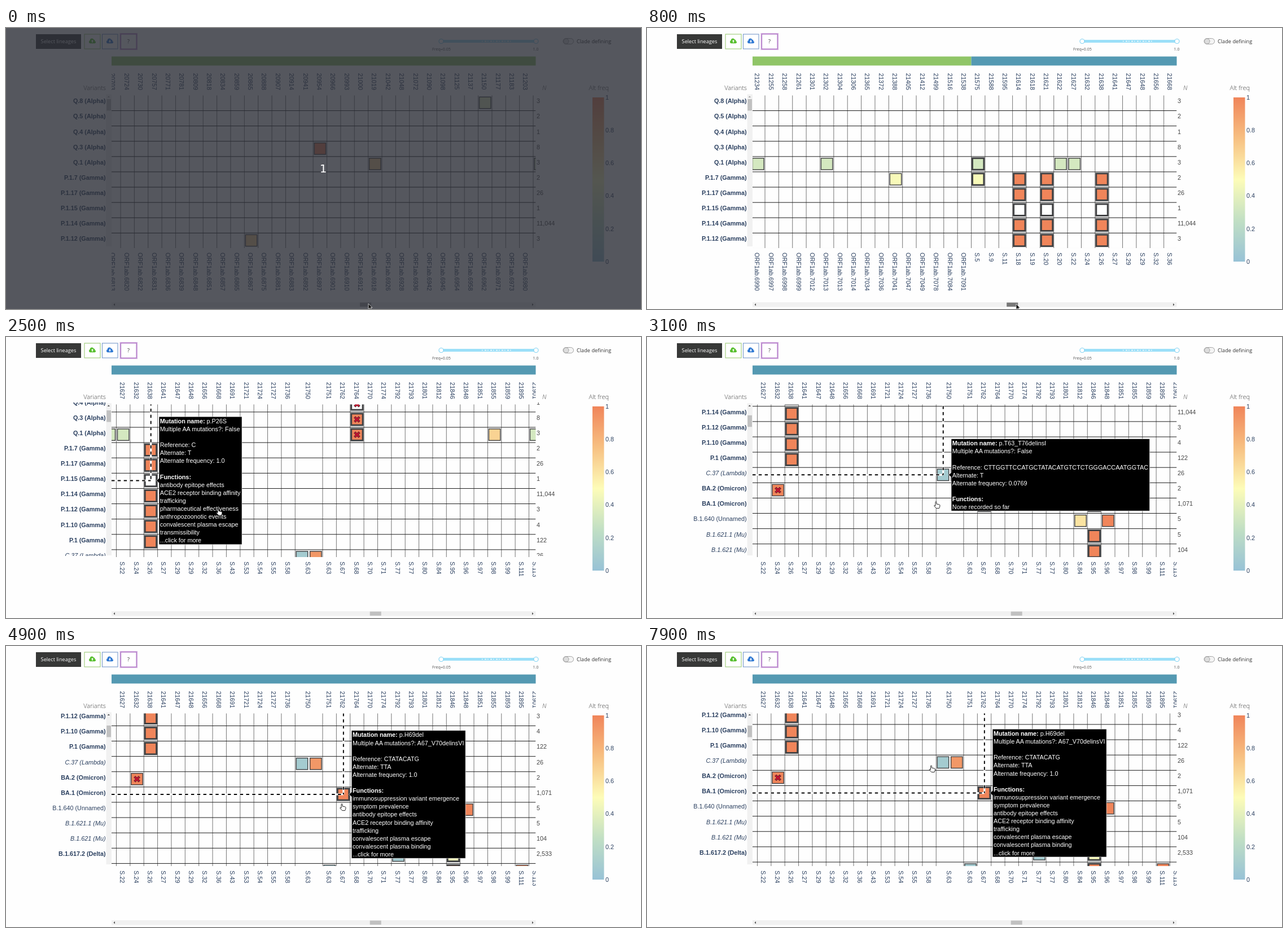
Write an HTML page that moves like this. It is 1125x498 px and loops after 8000 ms.

```html
<!DOCTYPE html>
<html lang="en">
<head>
<meta charset="utf-8">
<title>Mutation heatmap</title>
<style>
  html, body { margin: 0; width: 100%; height: 100%; overflow: hidden; background: #fefefe; }
  svg { display: block; width: 1125px; height: 498px; }
  text { font: 10.8px "Liberation Sans", Arial, sans-serif; fill: #2a3f5f; white-space: pre; }
  .ui { font: 9.2px "Open Sans", sans-serif; fill: #333; }
  .small { font-size: 7.1px; fill: #555; }
  .title { font: 300 11px "Open Sans", sans-serif; fill: #444; }
  .b { font-weight: bold; }
  .i { font-style: italic; }
  .n { fill: #444; }
  .end { text-anchor: end; }
  .mid { text-anchor: middle; }
  .tip text { fill: #fff; }
  .count { font: 20px "DejaVu Sans", sans-serif; fill: #fff; }
</style>
</head>
<body>
<svg viewBox="0 0 1125 498">
  <defs>
    <clipPath id="strip"><rect x="187" y="40" width="751.5" height="440"/></clipPath>
    <clipPath id="plot"><rect x="187" y="119.5" width="751.5" height="270.5"/></clipPath>
    <clipPath id="names"><rect y="116" width="1125" height="272"/></clipPath>
    <linearGradient id="scale" x1="0" y1="1" x2="0" y2="0"></linearGradient>
    <path id="cloud" d="M-3.7 4.3a2.7 2.7 0 0 1-.6-5.2A3.5 3.5 0 0 1 2.4-2.4 2.4 2.4 0 0 1 4.6.2 2.1 2.1 0 0 1 3.8 4.3z"/>
    <path id="arrow" d="M0-2l2.2 2.3H.8V2.8H-.8V.3H-2.2z" fill="#fff"/>
  </defs>
  <rect width="1125" height="498" fill="#fefefe"/>

  <rect x="53" y="11" width="80" height="26" fill="#373837"/>
  <text class="ui mid" x="93" y="27" style="fill:#fff">Select lineages</text>
  <g fill="#fff">
    <rect x="139" y="11" width="28" height="26" stroke="#92c66b"/>
    <rect x="170.5" y="11" width="27.5" height="26" stroke="#6c90c6"/>
    <rect x="203" y="10.5" width="28.5" height="27" stroke="#d3addf" stroke-width="3"/>
    <rect x="203.5" y="11" width="27.5" height="26" stroke="#a366bd"/>
  </g>
  <g transform="translate(153 23)"><use href="#cloud" fill="#57bf2e"/><use href="#arrow"/></g>
  <g transform="translate(184 23)"><use href="#cloud" fill="#3079d3"/><use href="#arrow" transform="translate(0 1) scale(1 -1)"/></g>
  <text class="ui mid" x="217" y="27">?</text>

  <rect x="771" y="21" width="168" height="5" rx="2" fill="#9bdff8"/>
  <path d="M843 23.5h53" stroke="#fff" stroke-width="1.5" stroke-dasharray="1.5 3.5 3 2"/>
  <g fill="#fff" stroke="#86d4f3" stroke-width="1.2"><circle cx="771" cy="23.5" r="4"/><circle cx="939" cy="23.5" r="4"/></g>
  <text class="ui small mid" x="771.5" y="39.5">Freq=0.05</text>
  <text class="ui small mid" x="938.5" y="39.5">1.0</text>
  <g stroke="#999" stroke-width=".9">
    <rect x="987" y="18.5" width="18.5" height="10" rx="5" fill="#f4f4f4"/>
    <circle cx="992.3" cy="23.5" r="4.7" fill="#ddd"/>
  </g>
  <text class="ui" x="1011" y="27">Clade defining</text>

  <text class="title end" x="177" y="110">Variants</text>
  <text class="title i" x="950" y="110">N</text>
  <text class="title" x="1032.5" y="110">Alt freq</text>
  <rect x="1039" y="123" width="20.5" height="291" fill="url(#scale)"/>
  <g id="ticks"></g>

  <g clip-path="url(#strip)"><g id="heads"></g></g>
  <g clip-path="url(#names)"><g id="labels"></g></g>
  <g clip-path="url(#plot)">
    <g id="cols"></g>
    <g id="rows"></g>
    <g id="cells"></g>
    <g id="tips"></g>
  </g>

  <rect x="177.5" y="117.5" width="9.5" height="269.5" fill="#f1f1f1"/>
  <path id="up" d="M179.6 123h4.4l-2.2-2.5z"/>
  <rect id="vthumb" x="178.2" y="126" width="7.8" height="20.5" fill="#c1c1c1"/>
  <rect x="187" y="486" width="751.5" height="8.5" fill="#f1f1f1"/>
  <path d="M193 488v4.4l-2.5-2.2zM932 488v4.4l2.5-2.2z" fill="#505050"/>
  <rect id="hthumb" y="486.6" width="20" height="7.3"/>

  <g id="countdown">
    <rect width="1125" height="498" fill="#2b2e36" fill-opacity=".8"/>
    <text class="count mid" x="562" y="256">1</text>
  </g>
  <path id="pointer" d="M0 0V9.8L2.3 7.8 3.8 11.2 5.4 10.5 4 7.2H7z" fill="#111" stroke="#fff" stroke-width=".7"/>
  <path id="hand" d="M3 1.4q1-1.3 2 0V5l4.4.8q1.700.4 1.6 2l-.4 2.4-1 2.4H4.600L1 8.700Q.4 7.300 1.700 7.300L3 8.200z" fill="#fff" stroke="#111" stroke-width=".9"/>
</svg>
<script>
const $ = id => document.getElementById(id);
const el = (parent, tag, attrs, text) => {
  const e = document.createElementNS('http://www.w3.org/2000/svg', tag);
  for (const k in attrs) e.setAttribute(k, attrs[k]);
  if (text !== undefined) e.textContent = text;
  parent.appendChild(e);
  return e;
};

const PITCH = 24.367, ROW = 27.11;

// Genome positions: an evenly wavering run, then the labelled stretch up to the spike gene.
const run = Array.from({ length: 31 }, (_, i) => Math.round(20703 + 16.7 * i + 6 * Math.sin(2.3 * i)));
const labelled = `21234 21255 21258 21261 21301 21302 21304 21306 21365 21372 21388 21405 21412 21499 21516
  21538 21575 21588 21595 21614 21618 21621 21622 21627 21632 21638 21641 21647 21648 21656 21668 21691
  21721 21724 21727 21736 21750 wide 21751 21762 21764 21770 21774 21792 21793 21801 21812 21846 21848
  21851 21855 21859 21895 21901`;
const sites = [...run.map(String), ...labelled.split(/\s+/)];
const home = sites.indexOf('21638');
const siteX = site => 256.4 + PITCH * (sites.indexOf(site) - home);
const rowY = row => 132.5 + ROW * row;

// Codon number within ORF1ab or S
const residue = p => p < 21563 ? 'ORF1ab.' + (Math.floor((p - 13469) / 3) + 4402)
                               : 'S.' + (Math.floor((p - 21563) / 3) + 1);

const lineages = [
  'Q.8 Alpha 3', 'Q.5 Alpha 2', 'Q.4 Alpha 1', 'Q.3 Alpha 8', 'Q.1 Alpha 3', 'P.1.7 Gamma 2', 'P.1.17 Gamma 26',
  'P.1.15 Gamma 1', 'P.1.14 Gamma 11,044', 'P.1.12 Gamma 3', 'P.1.10 Gamma 4', 'P.1 Gamma 122', 'C.37 Lambda 26',
  'BA.2 Omicron 2', 'BA.1 Omicron 1,071', 'B.1.640 Unnamed 5', 'B.1.621.1 Mu 5', 'B.1.621 Mu 104',
  'B.1.617.2 Delta 2,533', 'B.1.617.1 Kappa 7'
].map(s => s.split(' '));
const rowOf = name => lineages.findIndex(l => l[0] === name);
const styles = { Lambda: 'i', Mu: 'i', Unnamed: '' };

// Colour scale
const stops = [[151, 194, 214], [193, 223, 196], [253, 252, 184], [247, 192, 130], [240, 133, 90]];
const colour = v => {
  const k = Math.min(3, Math.floor(v * 4)), f = v * 4 - k;
  return `rgb(${stops[k].map((c, i) => Math.round(c + (stops[k + 1][i] - c) * f))})`;
};
stops.forEach((c, i) => el($('scale'), 'stop', { offset: i / 4, 'stop-color': `rgb(${c})` }));
for (let i = 0; i <= 5; i++) el($('ticks'), 'text', { x: 1062, y: 417.7 - 58.2 * i }, i / 5);

// Columns
const spikeStart = siteX('21538') + PITCH / 2;
el($('heads'), 'rect', { x: -1300, y: 50.5, width: spikeStart + 1300, height: 16, fill: '#90c567' });
el($('heads'), 'rect', { x: spikeStart, y: 50.5, width: 2000, height: 16, fill: '#5499b2' });
sites.forEach((site, i) => {
  const x = siteX(site), half = sites[i + 1] === 'wide';
  if (!half) el($('cols'), 'path', { d: `M${x + PITCH / 2} 119V390`, stroke: '#666', 'stroke-width': .9 });
  if (site === 'wide') return;
  const base = x - 5.4 + (half ? PITCH / 2 : 0);
  el($('heads'), 'text', { transform: `translate(${base} 80) rotate(90)` }, site);
  el($('heads'), 'text', { transform: `translate(${base} 398) rotate(90)` }, residue(+site));
});

// Rows
lineages.forEach(([name, family, n], r) => {
  const y = rowY(r);
  el($('labels'), 'text', { class: 'end ' + (styles[family] ?? 'b'), x: 176.5, y: y + .8 }, `${name} (${family})`);
  el($('labels'), 'text', { class: 'n', x: 940, y: y + .8 }, n);
  el($('rows'), 'path', { d: `M187 ${y + 14}H938.5`, stroke: '#1c1c1c' });
});

// Cells: functional sites get a heavy frame, multi-residue changes a cross,
// and signature mutations of single-sample lineages stay blank.
const functional = '21575 21614 21621 21638 21762 21764 21846';
const crossed = '21632 21764';
const cross = 'M0-1.3L1.5-2.8 2.8-1.5 1.3 0 2.8 1.5 1.5 2.8 0 1.3-1.5 2.8-2.8 1.5-1.3 0-2.8-1.5-1.5-2.8z';
function mark(row, value, list) {
  for (const site of list.split(' ')) {
    const x = siteX(site), y = rowY(row), s = 20.4;
    el($('cells'), 'rect', {
      x: x - s / 2, y: y - s / 2, width: s, height: s, fill: lineages[row][2] === '1' ? '#fff' : colour(value),
      stroke: '#404143', 'stroke-width': functional.includes(site) ? 2.9 : 1.4
    });
    if (crossed.includes(site)) el($('cells'), 'path', {
      transform: `translate(${x} ${y}) scale(1.9)`, fill: '#c5102f', stroke: '#40262b', 'stroke-width': .5, d: cross
    });
  }
}
const signature = { Alpha: '21764', Gamma: '21614 21621 21638', Mu: '21846', Kappa: '21846 21895' };
lineages.forEach(([, family], r) => signature[family] && mark(r, 1, signature[family]));
const extra = (name, value, list) => mark(rowOf(name), value, list);
extra('Q.8', .4, sites[27]);
extra('Q.3', 1, sites[15]);
extra('Q.1', .67, sites[19] + ' 21855');
extra('Q.1', .33, '21234 21302 21575 21622 21627 21901');
extra('P.1.7', .48, '21388 21575');
extra('P.1.12', .67, sites[10]);
extra('C.37', .08, '21750');
extra('C.37', .92, 'wide');
extra('BA.2', 1, '21632');
extra('BA.1', 1, '21762 21846');
extra('B.1.640', .6, '21812');
extra('B.1.640', 1, '21848');
extra('B.1.617.2', .08, '21792');
extra('B.1.617.2', .47, '21846');
extra('B.1.617.1', .08, '21751');

// Hover boxes with dashed guides
function tip(from, to, lineage, site, width, text) {
  const g = el($('tips'), 'g', { class: 'tip' });
  const x = siteX(site), y = rowY(rowOf(lineage)), lines = text.split('|');
  const h = 14.13 * lines.length + .6, left = x + 14.6, top = y - h / 2;
  const guide = `M187 ${y}H${x}M${x + .3} ${rowY(-.5)}V${y}`;
  el(g, 'path', { d: guide, stroke: '#fff', 'stroke-width': 3.2 });
  el(g, 'path', { d: guide, stroke: '#000', 'stroke-width': 1.9, 'stroke-dasharray': 5.42 });
  el(g, 'path', {
    d: `M${x + 10} ${y}l4.6-4v-${h / 2 - 4}h${width}v${h}h-${width}v-${h / 2 - 4}z`, stroke: '#fff', 'stroke-width': .6
  });
  lines.forEach((line, i) => {
    const t = el(g, 'text', { x: left + 1.8, y: top + 11.8 + 14.1 * i });
    const [, head, rest] = line.match(/^(Mutation name:|Functions:)?(.*)$/);
    if (head) el(t, 'tspan', { class: 'b' }, head);
    el(t, 'tspan', {}, rest);
  });
  return { g, from, to };
}
const tips = [
  tip(2200, 2800, 'P.1.15', '21638', 147, 'Mutation name: p.P26S|Multiple AA mutations?: False||Reference: C|' +
    'Alternate: T|Alternate frequency: 1.0||Functions:|antibody epitope effects|ACE2 receptor binding affinity|' +
    'trafficking|pharmaceutical effectiveness|anthropozoonotic events|convalescent plasma escape|' +
    'transmissibility|...click for more'),
  tip(2800, 3400, 'C.37', '21750', 351.5, 'Mutation name: p.T63_T76delinsI|Multiple AA mutations?: False||' +
    'Reference: CTTGGTTCCATGCTATACATGTCTCTGGGACCAATGGTAC|Alternate: T|Alternate frequency: 0.0769||' +
    'Functions:|None recorded so far'),
  tip(3700, 8000, 'BA.1', '21762', 202, 'Mutation name: p.H69del|Multiple AA mutations?: A67_V70delinsVI||' +
    'Reference: CTATACATG|Alternate: TTA|Alternate frequency: 1.0||Functions:|' +
    'immunosuppression variant emergence|symptom prevalence|antibody epitope effects|' +
    'ACE2 receptor binding affinity|trafficking|convalescent plasma escape|convalescent plasma binding|' +
    '...click for more')
];

// Motion
const progress = (t, a, b) => Math.min(1, Math.max(0, (t - a) / (b - a)));
const easeOut = f => 1 - (1 - f) ** 3;
// Each move: start time, end time, destination
const travel = (t, start, moves) => moves.reduce((p, [a, b, ...to]) =>
  p.map((v, i) => v + (to[i] - v) * progress(t, a, b)), start);

const dragX = t => travel(t, [1299], [[500, 800, 549.6], [800, 1200, 0]])[0];
const wheelY = t => travel(t, [0], [[2200, 2500, 67.8], [2500, 3100, 213.5]])[0]
                  + 38 * easeOut(progress(t, 4600, 5100));
const mouse = t => travel(t, [642, 488.5], [
  [500, 800, 654, 489], [800, 1200, 660, 489], [1600, 2100, 254, 318], [2200, 2800, 490, 289],
  [2800, 3100, 508, 291], [3300, 3500, 565, 288], [3600, 3800, 591, 288], [4600, 4900, 591, 279],
  [4900, 5200, 583, 261], [5300, 5400, 583, 254], [7200, 7900, 499.5, 211]
]);

const show = (e, on) => e.setAttribute('display', on ? 'inline' : 'none');
const move = (id, x, y) => $(id).setAttribute('transform', `translate(${x} ${y})`);

function draw(t) {
  const sx = dragX(t), sy = wheelY(t), at = mouse(t);
  move('heads', sx, 0);
  move('cols', sx, 0);
  move('cells', sx, -sy);
  for (const id of ['rows', 'labels', 'tips']) move(id, 0, -sy);
  tips.forEach(p => show(p.g, t >= p.from && t < p.to));
  move('vthumb', 0, sy * .06);
  $('up').setAttribute('fill', sy ? '#505050' : '#a3a3a3');
  move('hthumb', 644.7 - sx / 73.6, 0);
  $('hthumb').setAttribute('fill', t < 400 ? '#a8a8a8' : t < 1700 ? '#787878' : '#c1c1c1');
  show($('countdown'), t < 200);
  show($('pointer'), t < 2100);
  show($('hand'), t >= 2100);
  move('pointer', ...at);
  move('hand', ...at);
}
function loop() {
  draw(Math.floor(performance.now() % 8000 / 100) * 100);
  requestAnimationFrame(loop);
}
loop();
</script>
</body>
</html>
```
